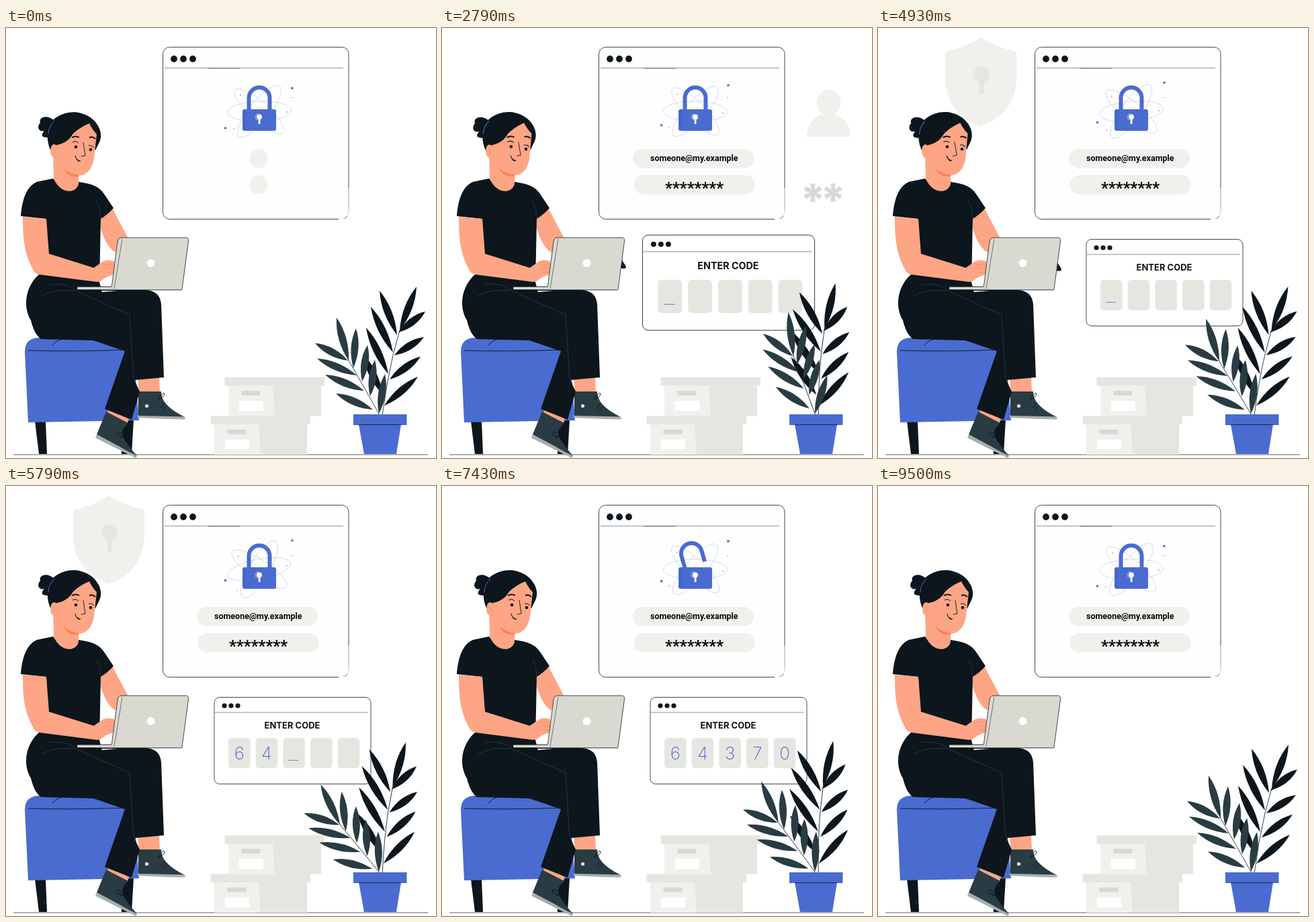
An HTML page with a canvas for the animation above (9.57 s loop, 640 px wide and 640 px high).

```html
<!DOCTYPE html>
<html lang="en">
<head>
<meta charset="utf-8">
<title>Two-step login</title>
<style>
html, body { margin: 0; width: 100%; height: 100%; overflow: hidden; background: #fff; }
canvas { display: block; width: 640px; height: 640px; }
</style>
</head>
<body>
<canvas id="stage" width="640" height="640"></canvas>
<script>
const ctx = document.getElementById('stage').getContext('2d');
const LOOP = 9570, FPS = 14;
const INK = '#0c161c', TEAL = '#293c44', BLUE = '#4a6bd0', SKIN = '#fea585', BLUSH = '#ff7f55';
const PALE = '#f1f0ed', LIGHT = '#e6e6e1', GREY = '#d9d9d1', SEAM = '#2c404a';
const EMAIL = 'someone@my.example', CODE = '64370';
const rad = Math.PI / 180;

// Eased value between [time, value] keys
function key(t, ...keys) {
  if (t <= keys[0][0]) return keys[0][1];
  for (let i = 1; i < keys.length; i++) {
    const [t0, a] = keys[i - 1], [t1, b] = keys[i];
    if (t <= t1) return a + (b - a) * (1 - Math.cos(Math.PI * (t - t0) / (t1 - t0))) / 2;
  }
  return keys[keys.length - 1][1];
}
const typed = (t, start, step, max) => Math.max(0, Math.min(max, Math.floor((t - start) / step) + 1));

function fill(d, color) {
  ctx.fillStyle = color;
  ctx.fill(new Path2D(d));
}
function line(d, color = INK, width = 1) {
  ctx.strokeStyle = color;
  ctx.lineWidth = width;
  ctx.stroke(new Path2D(d));
}
function rect(x, y, w, h, color) {
  ctx.fillStyle = color;
  ctx.fillRect(x, y, w, h);
}
function round(x, y, w, h, r, color, stroke) {
  ctx.beginPath();
  ctx.roundRect(x, y, w, h, r);
  ctx.fillStyle = color;
  ctx.fill();
  if (stroke) {
    ctx.strokeStyle = stroke;
    ctx.lineWidth = 0.9;
    ctx.stroke();
  }
}
function oval(x, y, rx, ry, color) {
  ctx.beginPath();
  ctx.ellipse(x, y, rx, ry, 0, 0, 7);
  ctx.fillStyle = color;
  ctx.fill();
}
const dot = (x, y, r, color) => oval(x, y, r, r, color);
function text(s, x, y, font, color, align = 'center') {
  ctx.font = font;
  ctx.fillStyle = color;
  ctx.textAlign = align;
  ctx.fillText(s, x, y);
}
function around(x, y, { turn = 0, scale = 1 }, draw) {
  if (scale <= 0.01) return;
  ctx.save();
  ctx.translate(x, y);
  ctx.rotate(turn * rad);
  ctx.scale(scale, scale);
  ctx.translate(-x, -y);
  draw();
  ctx.restore();
}

function drawShield(t) {
  const scale = key(t, [3.5, 0], [4.35, 1.09], [4.85, 1], [5.3, 1.08], [5.8, 1], [6.3, 1.08], [6.8, 0]);
  around(152.5, 80, { scale }, () => {
    fill('M153 14C168 24 184 31 201 34Q206 35 206 41V72C206 110 186 134 153 146C120 134 100 110 100 72V41Q100 35 105 34C122 31 138 24 153 14Z', PALE);
    dot(154.5, 69, 12, LIGHT);
    round(151, 72, 7, 26, 3, LIGHT);
  });
}

function drawUser(t) {
  if (t >= 4.05) return;
  around(575.5, 127, { scale: key(t, [1.05, 0], [1.35, 1.1], [1.6, 1]) }, () => {
    oval(575.5, 111, 18, 19.5, PALE);
    fill('M543 162C543 144 553 132 567 128V122H584V128C598 132 608 144 608 162Z', PALE);
  });
  [1.4, 2.15, 2.9].forEach((start, i) => {
    if (t < start) return;
    const x = 552 + i * 30;
    for (let a = 0; a < 360; a += 60)
      around(x, 245, { turn: a }, () => fill(`M${x - 2} 245L${x - 3.8} 231.5h7.6L${x + 2} 245Z`, GREY));
  });
}

function drawAtom(t) {
  const turn = key(t, [0, 0], [1.64, -6], [2.9, 3], [4.07, 3], [5.79, -9], [7.43, 2], [9.4, 0]);
  around(377, 124, { turn }, () => {
    ctx.strokeStyle = '#c3cbee';
    ctx.lineWidth = 0.7;
    for (const [angle, rx, ry] of [[-2, 47.5, 15], [42, 48, 14], [-51, 48.5, 15]]) {
      ctx.beginPath();
      ctx.ellipse(377, 124, rx, ry, angle * rad, 0, 7);
      ctx.stroke();
    }
    dot(349, 100, 0.8, BLUE);
    dot(418, 125, 0.8, BLUE);
    dot(339, 150, 0.7, BLUE);
  });
  const lift = key(t, [0, 0], [5.6, -8.5], [6.8, -8.5], [9.4, 0]);
  dot(426, 89.5 + lift, 1.8, BLUE);
  dot(326.5, 149 + lift, 1.8, BLUE);
  dot(425, 103.5, 0.7, BLUE);
}

function drawLock(t) {
  const turn = key(t, [7, 0], [7.25, -16], [8.3, -16], [8.6, 0]);
  around(361.5, 122, { turn }, () =>
    line('M361.5 124V104A15.5 15.5 0 0 1 392.5 104V121', BLUE, 6));
  round(352, 121, 50, 32, 3, BLUE);
  line('M355 123V151', '#3652ad', 0.7);
  line('M376 127.5A5 5 0 0 0 374 137', '#c9d2f2', 0.8);
  dot(377, 132.5, 4, '#fff');
  rect(375.7, 134, 2.8, 9, '#fff');
}

function drawWindow(t) {
  round(233.5, 28.5, 276.5, 256, 10, '#fefefe', '#30363a');
  line('M495 284.5H504Q510 283 510 275V238', '#fff', 1.4);
  line('M510 238V270', '#b5b5b5', 0.7);
  line('M236 59.5H502', '#8a8d8f', 0.9);
  line('M300 60H348', '#555', 0.8);
  for (const x of [250, 264, 278]) dot(x, 46, 4.9, INK);
  drawAtom(t);
  drawLock(t);
  const w = key(t, [0, 27], [0.5, 180]);
  const x = key(t, [0, 362.5], [0.5, 284]);
  round(x, 180, w, 28.5, 14, PALE);
  round(x + (w > 100 ? 1.5 : 0), 219, w, 28.5, 14, PALE);
  const font = '"Roboto", sans-serif';
  text(EMAIL.slice(0, typed(t, 0.55, 0.033, EMAIL.length)), 310, 198, `bold 12.5px ${font}`, '#080808', 'left');
  text('*'.repeat(typed(t, 1.32, 0.075, 8)), 332, 245.5, `bold 24px ${font}`, '#080808', 'left');
}

function drawDialog(t) {
  const scale = key(t, [2.4, 0], [2.8, 1.103], [3.1, 1], [7.5, 1], [7.6, 1.04], [7.9, 0]);
  around(426.5, 378.5, { scale }, () => {
    round(310, 314.5, 233, 129, 8, '#fff', '#30363a');
    line('M311 337H539', '#777', 0.8);
    for (const x of [325, 335, 345]) dot(x, 327, 3.6, INK);
    text('ENTER CODE', 426, 361, 'bold 13px "Inter", sans-serif', INK);
    const count = typed(t, 5.3, 0.35, 5);
    for (let i = 0; i < 5; i++) {
      const x = 331 + i * 40.7;
      round(x, 375, 32.6, 45, 5, LIGHT);
      if (i < count) text(CODE[i], x + 16.3, 406.5, '200 26px "Inter", sans-serif', BLUE);
      if (i === count) line(`M${x + 8} 408.3h15`, BLUE, 0.8);
    }
  });
}

function drawBubble(t) {
  const scale = key(t, [3.25, 0], [3.6, 1.08], [3.8, 1], [4.3, 1], [4.6, 0]);
  around(226, 230, { scale }, () => {
    const shape = 'M169 153.5H282Q287.5 153.5 287.5 159V210Q287.5 216 282 216H235L226 229L216 216H169Q163.5 216 163.5 210V159Q163.5 153.5 169 153.5Z';
    fill(shape, '#fff');
    line(shape, '#30363a', 0.9);
    text('YOUR CODE', 225.5, 170, 'bold 8px "Inter", sans-serif', INK);
    round(175, 175, 101, 30, 4, PALE);
    [...CODE].forEach((c, i) => text(c, 190 + i * 17.6, 196.5, '200 21px "Inter", sans-serif', BLUE));
  });
}

function drawCarton(x, y, h) {
  rect(x, y, 148.5, 12.5, LIGHT);
  rect(x + 5.5, y + 12.5, 138, h, LIGHT);
  fill(`M${x + 5.5} ${y + 12.5}h66l3 ${h}h-69Z`, PALE);
  rect(x + 25, y + 20, 28, 7, GREY);
  rect(x + 21.5, y + 35, 36, 15, '#fff');
}

function leaf(bx, by, tx, ty) {
  const dx = tx - bx, dy = ty - by, k = 11 / Math.hypot(dx, dy);
  const mx = bx + dx * 0.52, my = by + dy * 0.52;
  ctx.beginPath();
  ctx.moveTo(bx, by);
  ctx.quadraticCurveTo(mx - dy * k, my + dx * k, tx, ty);
  ctx.quadraticCurveTo(mx + dy * k, my - dx * k, bx, by);
  ctx.fill();
}
const darkLeaves = [
  [586, 450, 611, 385], [584, 453, 624, 422], [578, 487, 622, 460], [571, 523, 617, 489], [563, 562, 613, 519],
  [582, 457, 556, 391], [576, 483, 543, 415], [569, 515, 536, 446], [561, 546, 531, 485]];
const tealLeaves = [
  [510, 495, 492, 431], [509, 495, 460, 469], [522, 517, 463, 492], [533, 540, 475, 516], [546, 568, 491, 544],
  [517, 506, 521, 447], [530, 526, 538, 472], [542, 548, 549, 494], [555, 574, 564, 515]];

function drawPlant(t) {
  const dark = key(t, [0, 15], [2.13, 5.2], [4.2, 15], [4.75, 15], [6.85, 5.2], [9.3, 15]);
  const teal = key(t, [0, 24.3], [3.55, 14], [6.1, 35], [9.4, 24.3]);
  around(560, 575, { turn: dark - 15 }, () => {
    line('M560 577Q566 530 576 487L586 450', INK, 0.8);
    ctx.fillStyle = INK;
    for (const l of darkLeaves) leaf(...l);
  });
  around(556, 574, { turn: 24.3 - teal }, () => {
    line('M556 576Q536 540 509 493', INK, 0.8);
    ctx.fillStyle = TEAL;
    for (const l of tealLeaves) leaf(...l);
  });
  fill('M525 590H588L581 634H533Z', BLUE);
  rect(517, 575, 79.5, 16, BLUE);
  line('M525 590.5H588', INK, 0.8);
}

function drawChair() {
  fill('M43 585H59L61 634H49Z', INK);
  fill('M171 583H190L187 634H172Z', INK);
  fill('M33 587L28 482Q28 462 48 461L135 462L190 480L198 584Z', BLUE);
  line('M33 480Q100 482 177 479', INK, 0.9);
}

function drawShoes() {
  fill('M196 522L228 519L229 543H198Z', SKIN);
  fill('M154 566L183 582L180 590L150 574Z', SKIN);
  fill('M196 576L265 578Q269 582 265 582.5L240 582L196 580Z', '#a6afae');
  fill('M197 541H231C231 556 243 567 265 578.5L197 577Z', TEAL);
  dot(209.5, 562.5, 2.6, '#dfe3e0');
  line('M226 553Q236 538 236 546Q233 551 226 553M230 566L236 558M233 569L240 562', INK, 0.9);
  fill('M135 605L195 637L193 640L133 610Z', '#a6afae');
  fill('M149 571L182 588C167 602 171 608 195 637L135 605Z', TEAL);
  line('M172 603Q160 598 166 606Q172 610 181 605M169 610L176 608', INK, 0.9);
}

function drawPhoneArm(lift) {
  if (lift <= 0) return;
  around(163, 328, { turn: 80 * (1 - lift) }, () => {
    fill('M158 312L178 304Q195 298 203 290L218 282L224 290Q219 298 208 303L180 320L163 334Z', SKIN);
    fill('M193 289L219 248Q221 244 225 244L238 242.5Q242 243 240 247L214 288Q210 294 205 293.5L195 292.5Q192 292 193 289Z', INK);
    dot(231, 248, 0.9, '#fff');
    fill('M198 293Q195 288 201 287Q199 281 206 281Q207 275 213 277L219 277L223 264Q226 259 228 264Q229 273 227 284Q221 298 206 301Z', SKIN);
    line('M201 287L210 289M206 281L215 283M198 293L208 295', BLUSH, 0.6);
  });
}

function drawBody() {
  fill('M141 284L158 268L182 313L167 317L163 334C152 328 144 310 141 298Z', SKIN);
  fill('M70 224Q90 250 108 229C128 232 139 236 146 247L160 268Q151 278 141 284L139 382L62 374L60 284L22 280C24 256 30 236 46 229Z', INK);
  line('M135 258Q141 270 141 284', SEAM, 0.7);
  fill('M50 366L139 378L142 390H208Q229 391 231 411L235 520L191 524L199 541L187 583L147 567L177 481L130 465L52 463C44 457 40 447 37 435C25 415 28 385 50 366Z', INK);
  line('M64 382C90 379 96 385 108 393L184 427L190 523M53 399Q72 388 102 391', SEAM, 0.8);
  line('M69 472Q75 465 84 463', INK, 0.9);
}

function drawTypingArm(t) {
  const typing = (t > 0.5 && t < 2.3) || (t > 5.2 && t < 6.9);
  fill('M25 281L60 284L64 336L131 357L136 378L50 367Q42 366 39 357C28 335 25 318 25 281Z', SKIN);
  const turn = typing ? 3.5 * (1 - Math.cos((t - 1.64) * 22 + Math.PI)) : 0;
  around(131, 367, { turn }, () => {
    fill('M129 358L145 347Q152 344 161 347L162 366L149 371L139 378L130 376Z', SKIN);
    line('M146 352Q154 350 161 352M148 358Q155 356 161 358M150 364L160 363', BLUSH, 0.7);
  });
}

function drawLaptop() {
  fill('M172 312H268Q272 312 272 317L262 389H157L166 318Q167 312 172 312Z', GREY);
  line('M157 387L166 318Q167 312 172 312H268Q272 312 271.5 317L262 389', '#33383a', 0.9);
  line('M173 314L161 388', '#555a58', 0.8);
  dot(215.5, 350, 6, '#fff');
  round(106, 385, 54, 4.5, 2, GREY);
  line('M107 389.8H262M107 385H157', INK, 0.9);
  fill('M142 391H166L143 393Z', '#fff');
}

function drawHead(turn) {
  fill('M70 180L71 224C80 247 104 248 108 232L109 208Z', SKIN);
  around(88, 225, { turn }, () => {
    fill('M72 138C62 128 48 132 51 141C45 147 49 156 57 153C51 160 53 163 63 163L74 150Z', INK);
    fill('M74 193C60 180 58 152 68 139C80 126 100 123 112 127C133 132 147 154 139 170L133 182L80 190Z', INK);
    fill('M72 176L79 172C98 164 98 153 124 142Q129 152 135 158L131 194C128 213 117 222 104 219C92 216 79 208 73 192Z', SKIN);
    oval(71.5, 183, 5.5, 10, SKIN);
    fill('M76 174C90 171 98 163 101 154L82 150Z', INK);
    line('M72 138Q63 147 63 158', BLUE, 1);
    line('M70 179Q74 182 72 188', BLUSH, 0.7);
    dot(104, 177, 2.3, INK);
    dot(126, 181, 2.3, INK);
    line('M99 170Q103 167 108 171M123 175Q128 174 131 178', INK, 1);
    line('M98 163Q104 160 109 163M124 163Q129 161 133 165', INK, 2);
    line('M115 170L118 190L112 191', INK, 0.9);
    fill('M103 190C104 196 107 198 111 198Q105 201 103 190Z', INK);
    line('M103 190Q104 197 111 198', INK, 1.1);
    fill('M86 209C94 216 101 218 109 219L108 221C96 223 88 216 86 209Z', BLUSH);
  });
}

function drawScene(t) {
  ctx.clearRect(0, 0, 640, 640);
  drawShield(t);
  drawUser(t);
  drawWindow(t);
  drawDialog(t);
  line('M11 635H628', '#5c6265', 1);
  drawCarton(325.5, 520, 45);
  drawCarton(304.5, 577.5, 45);
  drawPlant(t);
  drawChair();
  drawShoes();
  const lift = key(t, [2.55, 0], [3.3, 1], [4.4, 1], [5.15, 0]);
  drawPhoneArm(lift);
  drawBody();
  drawTypingArm(t);
  drawLaptop();
  drawHead(-6 * lift);
  drawBubble(t);
}

function tick() {
  const ms = performance.now() % LOOP;
  drawScene(Math.floor((ms + 6) * FPS / 1000) / FPS);
  requestAnimationFrame(tick);
}
tick();
</script>
</body>
</html>
```
